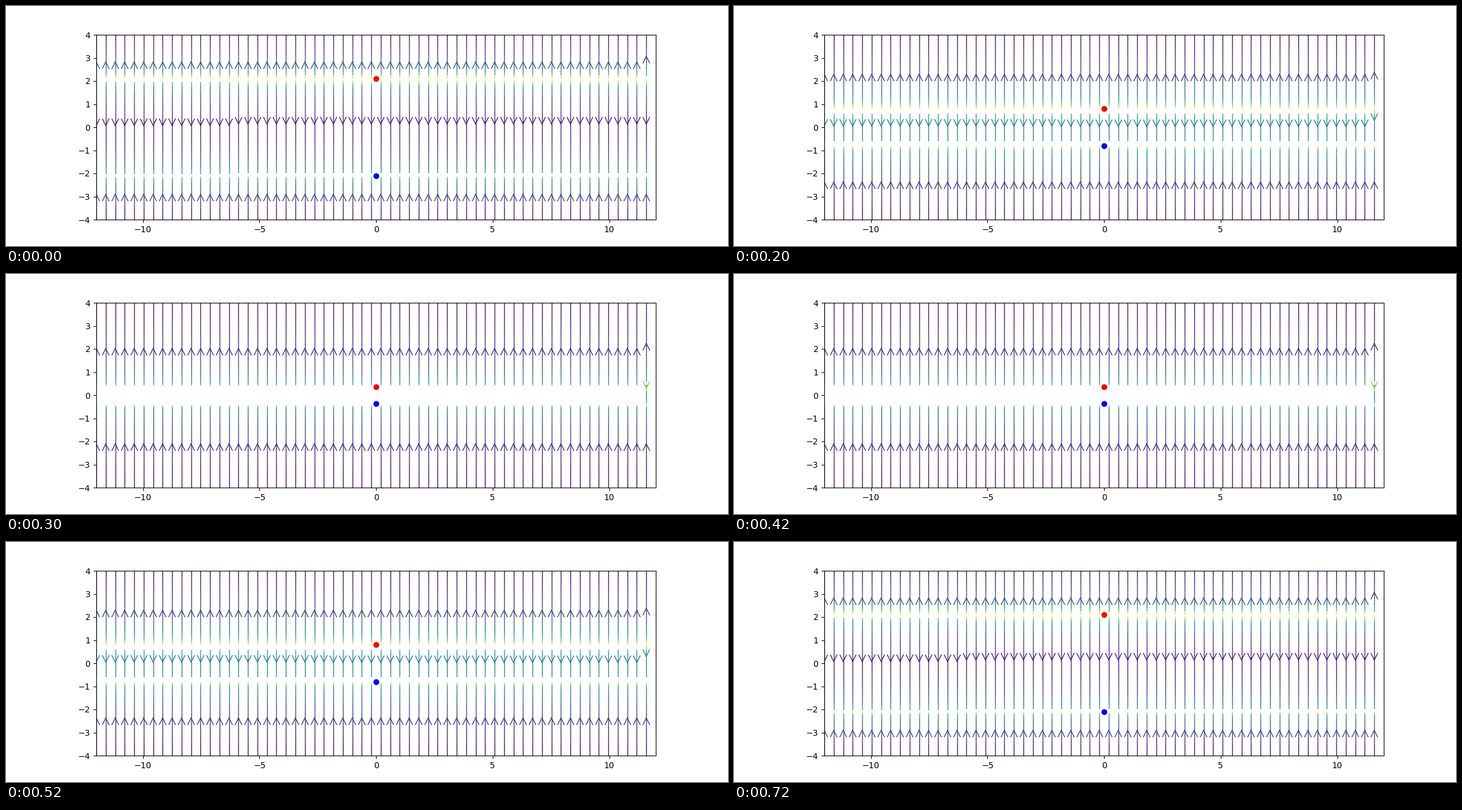
Animation of 1200x400 px, one loop 0.82 s. Source, as a matplotlib script:

```python
import numpy as np
import matplotlib.pyplot as plt
from matplotlib.animation import FuncAnimation

TICK = 20      # ms per drawn frame
TICKS = 41     # one loop of 820 ms
HOLD = 5       # ticks per pose; the closest pose lasts a single tick

x = np.linspace(-12, 12, 100)
y = np.linspace(-4, 4, 100)
X, Y = np.meshgrid(x, y)

fig, ax = plt.subplots(figsize=(12, 4), dpi=100)


def point_field(charge, height):
    """Vertical inverse-square field of a charge at the given height."""
    gap = Y - height
    return charge * gap / np.abs(gap) ** 3


def build_pose(height):
    """Draw both charges and their field, and return the artists."""
    old = set(ax.get_children())
    Ey = point_field(1, height) + point_field(-1, -height)
    ax.streamplot(x, y, np.zeros_like(Ey), Ey, color=np.log(np.abs(Ey)),
                  cmap="viridis", linewidth=1, density=2,
                  arrowstyle="->", arrowsize=2)
    ax.plot(0, height, "ro")
    ax.plot(0, -height, "bo")
    return [a for a in ax.get_children() if a not in old]


phases = np.linspace(0, np.pi, 10)[:5]
poses = [build_pose(2.1 - 2 * np.sin(p)) for p in phases]
ax.set_xlim(-12, 12)
ax.set_ylim(-4, 4)


def update(tick):
    current = min(tick // HOLD, (TICKS - 1 - tick) // HOLD)
    for i, artists in enumerate(poses):
        for artist in artists:
            artist.set_visible(i == current)
    return []


anim = FuncAnimation(fig, update, frames=TICKS, interval=TICK,
                     init_func=lambda: update(0), repeat=True, repeat_delay=0)
plt.show()
```
